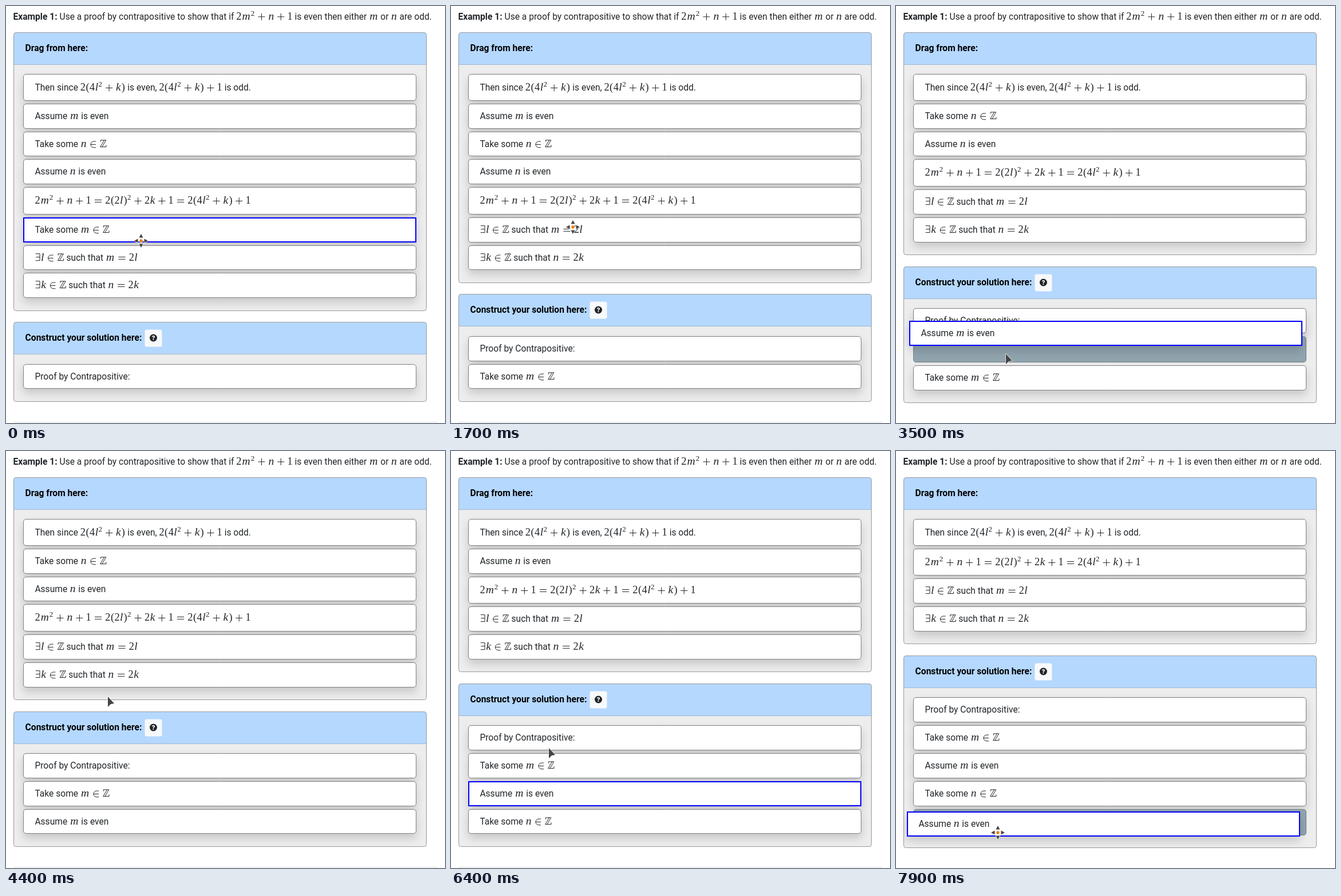
Animation of 767 by 730 pixels, one loop 8000 ms. Source, as an HTML page with a canvas:

```html
<!DOCTYPE html>
<html lang="en">
<head>
<meta charset="utf-8">
<title>Proof by contrapositive</title>
<style>
html, body { margin: 0; width: 767px; height: 730px; overflow: hidden; background: #fff; }
canvas { display: block; }
</style>
</head>
<body>
<canvas id="stage" width="767" height="730"></canvas>
<script>
const ctx = document.getElementById('stage').getContext('2d');
const LOOP = 8000, STEP = 100, LAG = 30;
const EM = 18.4, GAP = 5, LEFT = 30, WIDTH = 687;
const INK = '#212529';
const ROBOTO = '15.6px Roboto, sans-serif', SERIF = '"Liberation Serif", serif';

// Text between $ signs is math; superscripts make a block taller.
function block(text) {
  const tall = text.includes('^');
  const step = !tall ? 48.8 : text.startsWith('$') ? 52.6 : 51.4;
  return { text, step, base: tall ? 29 : 27 };
}
const intro = block('Proof by Contrapositive:');
const slot = { text: '', step: 51.4 };
const mEven = block('Assume $m$ is even'), nEven = block('Assume $n$ is even');
const mInZ = block('Take some $m∈ℤ$'), nInZ = block('Take some $n∈ℤ$');
const POOL = [
  block('Then since $2(4l^2+k)$ is even, $2(4l^2+k)+1$ is odd.'),
  mEven, nInZ, nEven,
  block('$2m^2+n+1=2(2l)^2+2k+1=2(4l^2+k)+1$'),
  mInZ,
  block('$∃l∈ℤ$ such that $m=2l$'),
  block('$∃k∈ℤ$ such that $n=2k$')
];

const drags = [
  { item: mInZ, start: 100, drop: 1100, grab: { x: 234, y: 391 } },
  { item: mEven, start: 3000, drop: 4000, grab: { x: 199, y: 210 } },
  { item: nInZ, start: 5200, drop: 6100, grab: { x: 163, y: 205 } },
  { item: nEven, start: 7300, drop: LOOP, grab: { x: 189.5, y: 205 } }
];

const leg = (start, end, x, y) => ({ start, end, x, y });
const legs = [
  leg(0, 800, 234, 667), leg(1300, 2000, 199, 206), leg(2800, 2900, 198, 212),
  leg(2900, 3650, 191, 655), leg(4000, 4800, 165, 205), leg(4800, 5000, 163, 200),
  leg(5100, 5580, 163, 665), leg(6100, 6900, 189, 207), leg(6900, 7100, 190, 213),
  leg(7200, 7900, 178, 668)
];

function pointerAt(t) {
  let x = 236, y = 411;
  for (const l of legs) {
    if (t <= l.start) break;
    const s = Math.min(1, (t - l.start) / (l.end - l.start));
    const f = s * s * (3 - 2 * s);
    x += (l.x - x) * f;
    y += (l.y - y) * f;
  }
  return { x, y };
}

function layoutCard(top, items) {
  let y = top + 73.4;
  const rows = items.map(item => {
    const row = { item, y };
    y += item.step;
    return row;
  });
  return { top, rows, bottom: y + 17.4 };
}
function layout(pool, answer) {
  const first = layoutCard(46, pool);
  return [first, layoutCard(first.bottom + 19.6, answer)];
}

function insertSlot(items, card, center) {
  const at = card.rows.filter(r => r.y + (r.item.step - GAP) / 2 < center).length;
  return [...items.slice(0, at), slot, ...items.slice(at)];
}

function sceneAt(t) {
  let pool = POOL, answer = [intro], held = null;
  for (const { item, start, drop, grab } of drags) {
    if (t < start) break;
    const home = layoutCard(46, pool).rows.find(r => r.item === item).y;
    pool = pool.filter(other => other !== item);
    if (t >= drop) {
      answer = [...answer, item];
      continue;
    }
    const p = pointerAt(t - LAG);
    held = { item, x: LEFT + p.x - grab.x, y: home + p.y - grab.y };
  }
  if (!held) return { cards: layout(pool, answer) };
  const center = held.y + 22;
  const bare = layout(pool, answer);
  const waiting = layout([...pool, slot], answer);
  if (center > waiting[1].top + 56) answer = insertSlot(answer, bare[1], center);
  else pool = insertSlot(pool, bare[0], center);
  return { cards: layout(pool, answer), held };
}

function hit(cards, p) {
  const row = cards.flatMap(c => c.rows).find(r =>
    p.y >= r.y && p.y < r.y + r.item.step - GAP && r.item !== intro);
  return row && row.item;
}

// Stroked symbols in em units, y down from the baseline.
const symbol = (width, pad, path) => ({ width, pad, path: new Path2D(path) });
const SYMBOLS = {
  '+': symbol(.778, .222, 'M.06-.25H.72M.39-.58V.08'),
  '=': symbol(.778, .278, 'M.06-.355H.72M.06-.145H.72'),
  '∈': symbol(.667, .278, 'M.58-.54H.375A.29.29 0 0 0 .375.04H.58M.085-.25H.58'),
  '∃': symbol(.556, 0, 'M.07-.67H.47V-.02H.07M.1-.345H.47'),
  'ℤ': symbol(.667, 0, 'M.09-.51V-.66H.6L.22-.02M.43-.66L.05-.02H.61V-.2')
};

function drawSymbol({ width, pad, path }, x, y) {
  ctx.save();
  ctx.translate(x + pad * EM, y);
  ctx.scale(EM, EM);
  ctx.lineWidth = 1 / EM;
  ctx.strokeStyle = INK;
  ctx.stroke(path);
  ctx.restore();
  return x + (width + 2 * pad) * EM;
}

function drawMath(source, x, y) {
  let raised = false;
  for (const ch of source) {
    if (ch === '^') { raised = true; continue; }
    if (SYMBOLS[ch]) { x = drawSymbol(SYMBOLS[ch], x, y); continue; }
    const letter = /[a-z]/.test(ch), digit = /\d/.test(ch);
    const size = (letter ? 19.6 : EM) * (raised ? .707 : 1);
    ctx.font = `${letter ? 'italic ' : ''}${size}px ${SERIF}`;
    const natural = ctx.measureText(ch).width;
    const advance = natural * (digit ? 1 : 1.15);
    ctx.fillText(ch, x + (advance - natural) / 2, y - (raised ? .363 * EM : 0));
    x += advance + (raised ? .05 * EM : 0);
    raised = false;
  }
  return x;
}

function drawText(text, x, y, bold = false, color = INK) {
  ctx.fillStyle = color;
  text.split('$').forEach((part, i) => {
    if (i % 2) { x = drawMath(part, x, y); return; }
    ctx.font = (bold ? 'bold ' : '') + ROBOTO;
    ctx.fillText(part, x, y);
    x += ctx.measureText(part).width;
  });
  return x;
}

function box(x, y, w, h, radius, fill, stroke) {
  ctx.beginPath();
  ctx.roundRect(x + .5, y + .5, w - 1, h - 1, radius);
  if (fill) {
    ctx.fillStyle = fill;
    ctx.fill();
  }
  ctx.shadowColor = 'transparent';
  if (!stroke) return;
  ctx.strokeStyle = stroke;
  ctx.lineWidth = 1;
  ctx.stroke();
}

function drawBlock(item, left, top, active) {
  const x = Math.round(left), y = Math.round(top);
  const h = Math.round(top + item.step - GAP) - y;
  if (item === slot) {
    box(x, y, WIDTH, h, 4.5, '#90a4ae', '#788187');
    return;
  }
  ctx.shadowColor = 'rgba(0,0,0,.17)';
  ctx.shadowBlur = 16;
  ctx.shadowOffsetY = 8;
  box(x, y, WIDTH, h, active ? 0 : 4.5, '#fff', active ? null : '#808080');
  if (active) {
    ctx.strokeStyle = '#00f';
    ctx.lineWidth = 2;
    ctx.strokeRect(x + 1, y + 1, WIDTH - 2, h - 2);
  }
  drawText(item.text, x + 20.4, y + item.base);
}

function drawCard(card, title, hovered) {
  const y = Math.round(card.top), h = Math.round(card.bottom) - y;
  box(13, y, 722, h, 4, '#ededed');
  box(13, y, 722, 57, [4, 4, 0, 0], '#b5d8ff');
  ctx.fillStyle = '#a0b8d2';
  ctx.fillRect(14, y + 56, 720, 1);
  box(13, y, 722, h, 4, null, '#999');
  drawText(title, 33.6, y + 33, true, '#000');
  card.rows.forEach(r => drawBlock(r.item, LEFT, r.y, r.item === hovered));
}

function drawHelp(top) {
  const y = Math.round(top);
  box(242, y + 13, 31, 31, 3.5, '#f8f9fa');
  ctx.beginPath();
  ctx.arc(257.5, y + 28, 6.5, 0, Math.PI * 2);
  ctx.fillStyle = INK;
  ctx.fill();
  ctx.fillStyle = '#fff';
  ctx.font = '900 11px Roboto, sans-serif';
  ctx.textAlign = 'center';
  ctx.fillText('?', 257.5, y + 32);
  ctx.textAlign = 'left';
}

function outlined(path, fill) {
  ctx.lineJoin = 'round';
  ctx.lineWidth = 1.5;
  ctx.strokeStyle = 'rgba(255,255,255,.85)';
  ctx.stroke(path);
  ctx.fillStyle = fill;
  ctx.fill(path);
}

const ARROW = new Path2D('M0 0V18L5 13L11 12Z');
const TIP = new Path2D('M0-12L3.5-5.5H-3.5Z');
const DOT = new Path2D('M2.7 0A2.7 2.7 0 1 1-2.7 0A2.7 2.7 0 1 1 2.7 0Z');

function drawPointer({ x, y }, moving) {
  ctx.save();
  ctx.translate(Math.round(x), Math.round(y));
  if (moving) {
    for (let i = 0; i < 4; i++) {
      outlined(TIP, '#444');
      ctx.rotate(Math.PI / 2);
    }
    outlined(DOT, '#f57900');
  } else outlined(ARROW, '#444');
  ctx.restore();
}

function draw(t) {
  const { cards, held } = sceneAt(t);
  const pointer = pointerAt(t), under = hit(cards, pointer);
  // Hover styling trails the pointer by one step.
  const hovered = held ? null : hit(cards, pointerAt(t - STEP));

  ctx.fillStyle = '#fff';
  ctx.fillRect(0, 0, 767, 730);
  const x = drawText('Example 1:', 12.5, 23.5, true);
  drawText(' Use a proof by contrapositive to show that if $2m^2+n+1$ is even then either $m$ or $n$ are odd.', x, 23.5);
  drawCard(cards[0], 'Drag from here:', hovered);
  drawCard(cards[1], 'Construct your solution here:', hovered);
  drawHelp(cards[1].top);
  ctx.fillStyle = '#e3e3e3';
  ctx.fillRect(13, Math.round(cards[1].bottom + 35.4), 741, 1);
  if (held) drawBlock(held.item, held.x, held.y, true);
  const outrun = held && under === slot && pointer.y > held.y + 44;
  drawPointer(pointer, held ? !outrun : under);
}

function frame() {
  draw(Math.floor((performance.now() % LOOP) / STEP) * STEP);
  requestAnimationFrame(frame);
}
frame();
</script>
</body>
</html>
```
